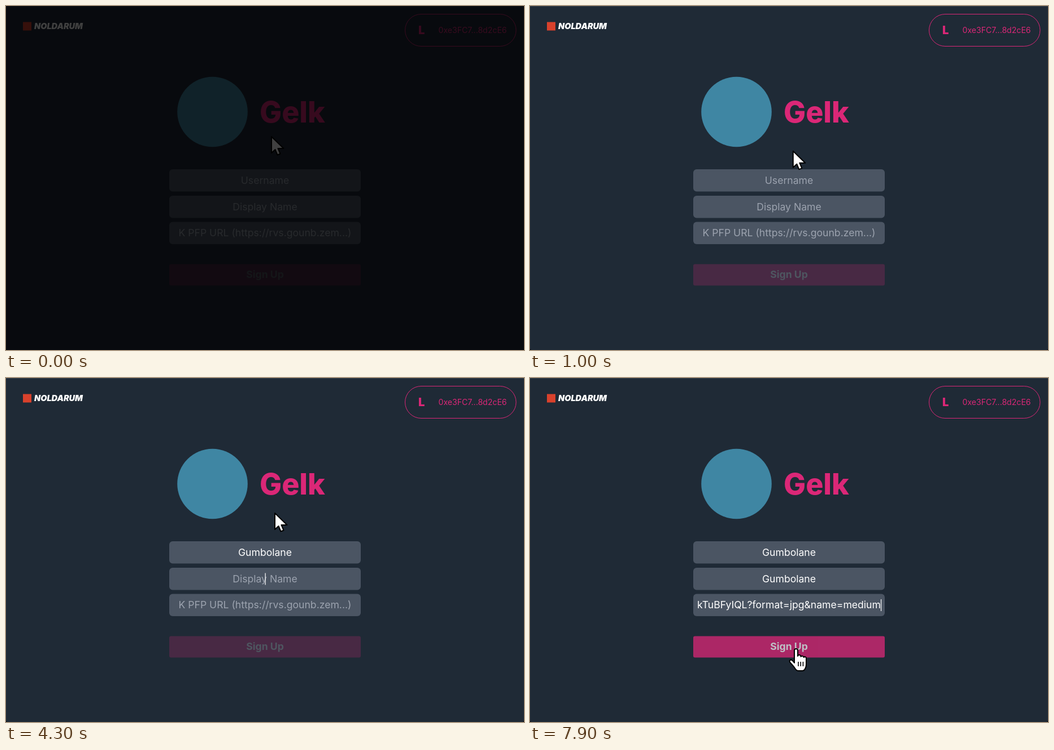
An HTML page that plays this animation: 917 by 611 pixels, repeating every 8 s.

```html
<!DOCTYPE html>
<html lang="en">
<head>
<meta charset="utf-8">
<title>Sign up form</title>
<style>
  html, body { margin: 0; width: 100%; height: 100%; overflow: hidden; background: #000; }
  svg { display: block; width: 917px; height: 611px; font: 17.6px Inter, sans-serif; }
  .mid { text-anchor: middle; }
  .pink { fill: #db2777; }
  #cursor path { fill: #fff; stroke: #000; stroke-width: 2; stroke-linejoin: round; }
  #beam path { fill: none; stroke-linecap: round; }
</style>
</head>
<body>
<svg id="stage" viewBox="0 0 917 611">
  <path d="M0 0H917V608a3 3 0 0 1-3 3H3a3 3 0 0 1-3-3Z" fill="#1f2a36"/>
  <path d="M0 .5H917" stroke="#36404b"/>

  <rect x="30" y="28.5" width="15" height="15" fill="#d9412c"/>
  <text x="50" y="41" fill="#fff" font-size="14.5" font-weight="900" font-style="italic">NOLDARUM</text>

  <rect x="706.5" y="14.5" width="196.5" height="57" rx="28.5" fill="none" stroke="#db2777"/>
  <text class="pink" x="730" y="50" font-size="20" font-weight="900">L</text>
  <text class="pink" x="765.5" y="48" font-size="14.1">0xe3FC7...8d2cE6</text>

  <circle cx="365.5" cy="188" r="62.3" fill="#3f86a3"/>
  <text class="pink" x="449" y="207" font-size="52" font-weight="800">Gelk</text>

  <g id="fields"></g>
  <rect id="caret" width="1.2" height="21" fill="#fff"/>

  <g id="button">
    <rect class="pink" x="289" y="458.5" width="339" height="38" rx="3"/>
    <text class="mid" x="458.5" y="483" fill="#f3f4f6" font-weight="700">Sign Up</text>
  </g>

  <g id="cursor">
    <g id="arrow"><path d="M0 0V29L6.5 23 10.5 32.5 15.5 30.5 11.5 21H21.5Z"/></g>
    <g id="beam">
      <path d="M-5-14Q0-14 0-10V10Q0 14-5 14M5-14Q0-14 0-10V10Q0 14 5 14" style="stroke:#fff;stroke-width:4"/>
      <path d="M-5-14Q0-14 0-10V10Q0 14-5 14M5-14Q0-14 0-10V10Q0 14 5 14"/>
    </g>
    <g id="hand">
      <path d="M-3 25V3a3 3 0 0 1 6 0V13a2.8 2.8 0 0 1 5.5 1a2.8 2.8 0 0 1 5 1a2.6 2.6 0 0 1 4.5 2V27Q18 33 15 37Q14 39 11 39H4Q1 39-1 36Q-4 31-10 25Q-13 21-10 20Q-7 19-3 25Z"/>
      <path d="M4 23v8M8.2 23v8M12.4 23v8" style="stroke-width:1.6"/>
    </g>
  </g>
</svg>
<script>
const LOOP = 8000, CENTER = 458.5, NAME = 'Gumbolane';
const $ = id => document.getElementById(id);

const firstKeys = [3000, 3100, 3200, 3300, 3400, 3500, 3600, 3600, 3700];
const secondKeys = [4600, 4700, 4800, 4900, 5000, 5100, 5200, 5500, 5600];
const CLICK = 1600, TAB_1 = 4000, TAB_2 = 6000, PASTE = 6800;
const inputs = [CLICK, ...firstKeys, TAB_1, ...secondKeys, TAB_2, PASTE];

// time, x, y of the pointer tip
const pointerPath = [
  [0, 470, 232], [800, 470, 232], [1300, 458, 305], [1700, 458, 305], [1900, 475, 252],
  [2000, 475, 252], [2200, 476, 240], [7200, 476, 240], [7800, 471, 481], [LOOP, 471, 481]
];

const fields = [
  { top: 290, hint: 'Username', value: t => typed(firstKeys, t) },
  { top: 337, hint: 'Display Name', value: t => typed(secondKeys, t) },
  { top: 383.5, hint: 'K PFP URL (https://rvs.gounb.zem...)',
    value: t => t < PASTE ? '' : 'kTuBFyIQL?format=jpg&name=medium' }
];

function add(tag, attrs) {
  const el = document.createElementNS('http://www.w3.org/2000/svg', tag);
  for (const key in attrs) el.setAttribute(key, attrs[key]);
  return $('fields').appendChild(el);
}

for (const f of fields) {
  add('rect', { x: 289, y: f.top, width: 339, height: 39.5, rx: 6, fill: '#4b5563' });
  f.text = add('text', { class: 'mid', x: CENTER, y: f.top + 25.8 });
}

function typed(keys, t) {
  return NAME.slice(0, keys.filter(k => k <= t).length);
}

function pointerAt(t) {
  const i = pointerPath.findIndex(p => p[0] > t);
  const [t0, x0, y0] = pointerPath[i - 1], [t1, x1, y1] = pointerPath[i];
  const u = (t - t0) / (t1 - t0), e = u * u * (3 - 2 * u);
  return [x0 + (x1 - x0) * e, y0 + (y1 - y0) * e];
}

function drawFields(t) {
  for (const f of fields) {
    const value = f.value(t);
    f.text.textContent = value || f.hint;
    f.text.setAttribute('fill', value ? '#fff' : '#9ca3af');
    f.end = CENTER + (value ? f.text.getComputedTextLength() / 2 : 0);
  }
  const focus = fields[t < TAB_1 ? 0 : t < TAB_2 ? 1 : 2];
  const lastInput = Math.max(...inputs.filter(k => k <= t));
  const lit = t >= CLICK && Math.floor((t - lastInput) / 500) % 2 === 0;
  $('caret').setAttribute('x', focus.end);
  $('caret').setAttribute('y', focus.top + 9.5);
  $('caret').style.display = lit ? '' : 'none';
}

function drawPointer(t) {
  const [x, y] = pointerAt(t);
  const shape = fields.some(f => y >= f.top && y <= f.top + 39.5) ? 'beam'
    : y >= 458 && y <= 497 ? 'hand' : 'arrow';
  for (const id of ['arrow', 'beam', 'hand']) $(id).style.display = id === shape ? '' : 'none';
  $('cursor').setAttribute('transform', `translate(${x} ${y})`);
}

function draw(now) {
  const t = Math.floor(now % LOOP / 100) * 100;
  const light = Math.min(1, 0.25 + t * 0.0019);
  $('stage').style.filter = light < 1 ? `brightness(${light})` : 'none';
  drawFields(t);
  $('button').setAttribute('opacity', t < PASTE ? 0.22 : t < PASTE + 100 ? 0.5 : 0.75);
  drawPointer(t);
}

const start = performance.now();
(function tick() {
  draw(performance.now() - start);
  requestAnimationFrame(tick);
})();
</script>
</body>
</html>
```
